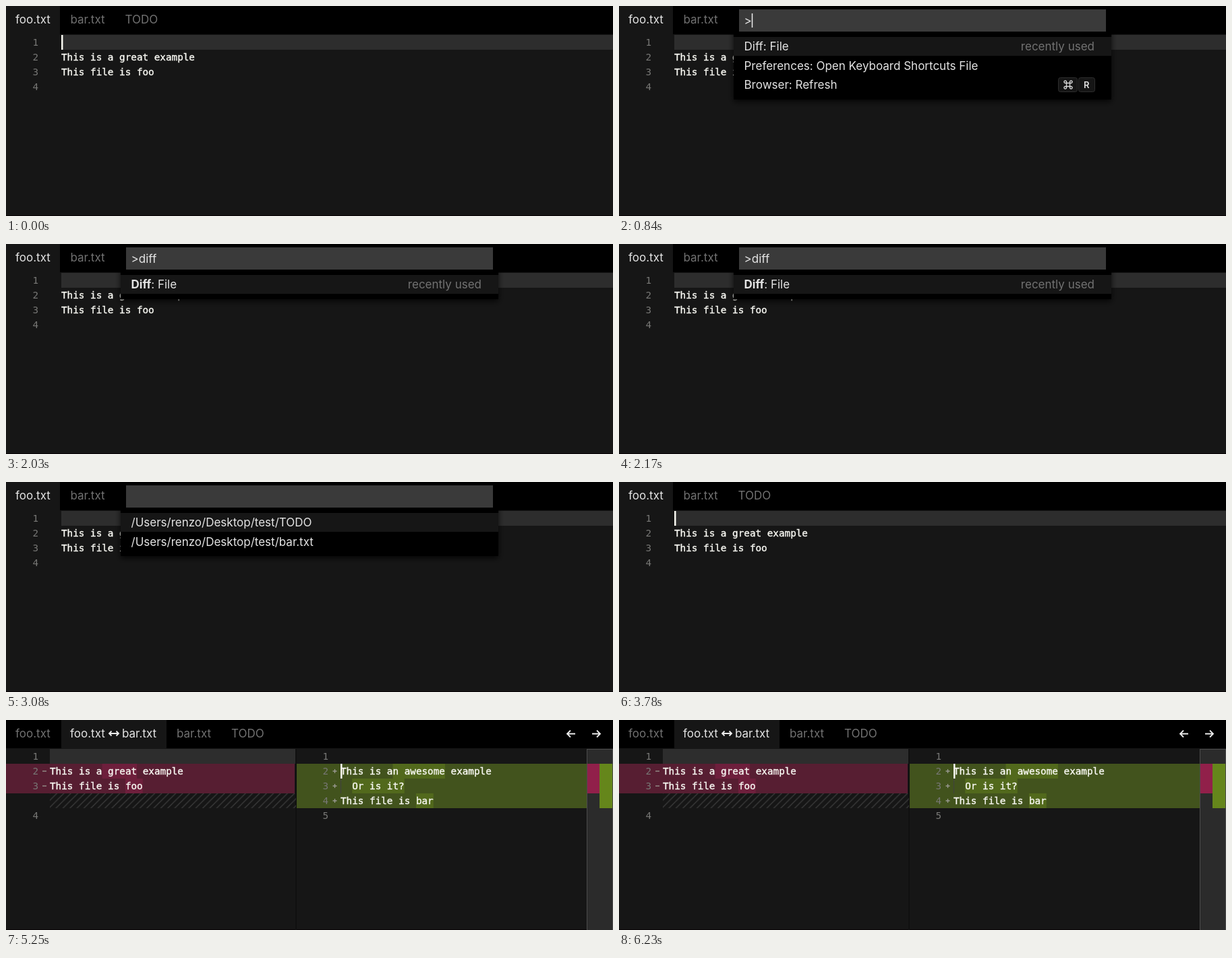
Recreate the animation shown at these times as an HTML page. Size 900x312 px, loop 6.3 s.

```html
<!DOCTYPE html>
<html lang="en">
<head>
<meta charset="utf-8">
<title>File diff in an editor</title>
<style>
html, body { margin: 0; width: 100%; height: 100%; overflow: hidden; background: #161616; }
svg { display: block; width: 900px; height: 312px; }
.ui { font: 17px Inter, sans-serif; fill: #e4e4e4; }
.code { font: 14.3px "DejaVu Sans Mono", monospace; fill: #f8f8f2; stroke: #f8f8f2; stroke-width: .4px; }
.num { font: 14.3px "DejaVu Sans Mono", monospace; fill: #787876; text-anchor: end; }
.sign { stroke: #9a9a92; stroke-width: 1.3; fill: none; }
.dim { fill: #717171; }
.end { text-anchor: end; }
.bold { font-weight: 700; }
.arrow { fill: none; stroke: #ececec; stroke-width: 1.8; }
</style>
</head>
<body>
<svg id="stage" viewBox="0 0 900 312" xmlns="http://www.w3.org/2000/svg">
  <defs>
    <filter id="shadow" x="-10%" y="-20%" width="120%" height="150%">
      <feDropShadow dx="0" dy="3" stdDeviation="4" flood-color="#000" flood-opacity=".8"/>
    </filter>
    <pattern id="hatch" width="10.36" height="10.36" patternUnits="userSpaceOnUse" x="65" y="109">
      <path d="M-2 2L2 -2M-2 12.36L12.36 -2M8.36 12.36L12.36 8.36" stroke="#3b3b3b" stroke-width="1.3"/>
    </pattern>
  </defs>
</svg>
<script>
const LOOP = 6300, CHAR = 8.61, ROW = 22, TOP = 43, BASE = 16;
const OPEN = 770, PICK = 2310, DOWN = 3150, CLOSE = 3570, SPLIT = 4830, DIFF = 4970;
const KEYS = [1260, 1330, 1400, 1470];
const stage = document.getElementById("stage");

const rect = (x, y, w, h, fill, more = "") =>
  `<rect x="${x}" y="${y}" width="${w}" height="${h}" fill="${fill}" ${more}/>`;
const text = (x, y, s, cls = "ui") => `<text x="${x}" y="${y}" class="${cls}">${s}</text>`;
const path = (d, cls) => `<path d="${d}" class="${cls}"/>`;
const rowY = n => TOP + ROW * (n - 1);
const code = (x, n, s) => text(x, rowY(n) + BASE, s, "code");
const num = (x, n, s = n) => text(x, rowY(n) + BASE, s, "num");
const nums = (x, count) => Array.from({ length: count }, (_, i) => num(x, i + 1)).join("");
const mark = (x, n, from, to, fill) =>
  rect(x + from * CHAR, rowY(n), (to - from) * CHAR, ROW, fill);

function layer(html) {
  const g = document.createElementNS("http://www.w3.org/2000/svg", "g");
  g.innerHTML = html;
  stage.append(g);
  return g;
}

const fooText = x => code(x, 2, "This is a great example") + code(x, 3, "This file is foo");
const barText = code(496, 2, "This is an awesome example") +
  code(496 + 2 * CHAR, 3, "Or is it?") + code(496, 4, "This file is bar");
const ruler = rect(861.5, 43.5, 38, 275, "#2b2b2b", 'stroke="#4c4c4c"');
const guide = rect(496, rowY(3), 1, ROW, "#404040");
const divider = rect(429, 43, 2, 269, "#101010");
const caret = (x, n) => rect(x, rowY(n), 2.5, ROW, "#f8f8f0");

layer(rect(0, 0, 900, 312, "#161616") + rect(0, 0, 900, 42, "#000") + rect(0, 311, 900, 1, "#080406"));

const tabs = layer(rect(0, 0, 80, 43, "#161616") + text(14, 26, "foo.txt") +
  text(95.5, 26, "bar.txt", "ui dim") + text(176.5, 26, "TODO", "ui dim"));

const diffTabs = layer(rect(82, 0, 156, 43, "#161616") + text(14, 26, "foo.txt", "ui dim") +
  text(95, 26, "foo.txt") + text(172, 26, "bar.txt") +
  text(253, 26, "bar.txt", "ui dim") + text(334, 26, "TODO", "ui dim") +
  path("M153 20H167M156.5 16.5L153 20L156.5 23.5M163.5 16.5L167 20L163.5 23.5", "arrow") +
  path("M844 20.5H832M837 15.5L832 20.5L837 25.5", "arrow") +
  path("M869 20.5H881M876 15.5L881 20.5L876 25.5", "arrow"));

const single = layer(rect(82, TOP, 818, ROW, "#2d2d2d") + nums(48, 4) + fooText(82));
const singleCaret = layer(caret(82, 1));

const plainSplit = layer(rect(65, TOP, 364, ROW, "#2d2d2d") + rect(496, rowY(2), 365, ROW, "#2d2d2d") +
  divider + nums(48, 4) + nums(478, 5) + ruler + guide + fooText(65) + barText);

const minus = n => path(`M54 ${rowY(n) + 11}h6`, "sign");
const plus = n => path(`M484.5 ${rowY(n) + 11}h6m-3 -3v6`, "sign");
const diffSplit = layer(
  rect(65, TOP, 364, ROW, "#2d2d2d") + divider +
  rect(0, rowY(2), 428, 2 * ROW, "#571e32") +
  mark(65, 2, 9, 15, "#6e1f3c") + mark(65, 3, 13, 16, "#6e1f3c") +
  rect(65, rowY(4), 365, ROW, "url(#hatch)") +
  rect(431, rowY(2), 430, 3 * ROW, "#42531d") +
  mark(496, 2, 9, 18, "#52691c") + mark(496, 3, 2, 11, "#52691c") + mark(496, 4, 13, 16, "#52691c") +
  nums(48, 3) + num(48, 5, 4) + nums(478, 5) +
  [2, 3].map(minus).join("") + [2, 3, 4].map(plus).join("") +
  ruler + rect(862, rowY(2), 18, 2 * ROW, "#91204a") + rect(880, rowY(2), 19, 3 * ROW, "#65861b") +
  guide + fooText(65) + barText);
const splitCaret = layer(caret(496, 2));

// Dropdown panel: bottom edge, highlighted row and its labels
const panel = (bottom, chosen, labels) =>
  rect(170, 0, 560, bottom, "#000", 'filter="url(#shadow)"') +
  rect(178, 5, 544, 33, "#3a3a3a") +
  rect(170, 46 + 28.5 * chosen, 560, 28, "#161616") +
  labels.map((s, i) => text(185.5, 66 + 28.5 * i, s)).join("");
const recent = text(705, 66, "recently used", "ui dim end");
const key = (x, w) => rect(x + .5, 106.5, w - 1, 21, "#151515", 'rx="3" stroke="#2d2d2d"');
const command = "M663.5 114.5h5v5h-5zM663.5 114.5h-1.7a1.8 1.8 0 1 1 1.7 -1.7zM668.5 114.5v-1.7a1.8 1.8 0 1 1 1.7 1.7z" +
  "M668.5 119.5h1.7a1.8 1.8 0 1 1 -1.7 1.7zM663.5 119.5v1.7a1.8 1.8 0 1 1 -1.7 -1.7z";

const menu = layer(
  panel(139, 0, ["Diff: File", "Preferences: Open Keyboard Shortcuts File", "Browser: Refresh"]) + recent +
  key(651, 29) + key(681, 25) +
  `<path d="${command}" fill="none" stroke="#ddd" stroke-width="1.3"/>` +
  `<text x="693.3" y="122" class="ui" style="font-size:13px;font-weight:600;text-anchor:middle">R</text>`);

const matches = KEYS.map((_, i) => {
  const hit = "Diff".slice(0, i + 1), rest = "Diff: File".slice(i + 1);
  return layer(panel(82, 0, [`<tspan class="bold">${hit}</tspan>${rest}`]) + recent);
});

const home = "/Users/renzo/Desktop/test/";
const picks = [0, 1].map(i => layer(panel(110, i, [home + "TODO", home + "bar.txt"])));

const input = layer(text(185.5, 28, "") + rect(0, 11, 1.5, 21, "#eee"));
const typed = input.querySelector("text");
const inputCaret = input.querySelector("rect");

const show = (el, on) => el.setAttribute("display", on ? "inline" : "none");
const blink = (t, since) => (t - since) % 1000 < 500;

function draw(t) {
  const count = KEYS.filter(k => t >= k).length;
  const asking = t >= OPEN && t < PICK;
  const picking = t >= PICK && t < CLOSE;
  const split = t >= SPLIT, diff = t >= DIFF;

  show(tabs, !diff);
  show(diffTabs, diff);
  show(single, !split);
  show(singleCaret, t < OPEN ? blink(t, 0) : t >= CLOSE && !split && blink(t, CLOSE));
  show(plainSplit, split && !diff);
  show(diffSplit, diff);
  show(splitCaret, split && blink(t, SPLIT));

  show(menu, asking && count === 0);
  matches.forEach((m, i) => show(m, asking && count === i + 1));
  show(picks[0], picking && t < DOWN);
  show(picks[1], picking && t >= DOWN);

  show(input, asking || picking);
  if (asking || picking) {
    typed.textContent = asking ? ">" + "diff".slice(0, count) : "";
    const since = picking ? PICK : count ? KEYS[count - 1] : OPEN;
    inputCaret.setAttribute("x", 185.5 + (asking ? typed.getComputedTextLength() : 0));
    show(inputCaret, blink(t, since));
  }
}

function tick(now) {
  draw(now % LOOP);
  requestAnimationFrame(tick);
}
draw(0);
requestAnimationFrame(tick);
</script>
</body>
</html>
```
